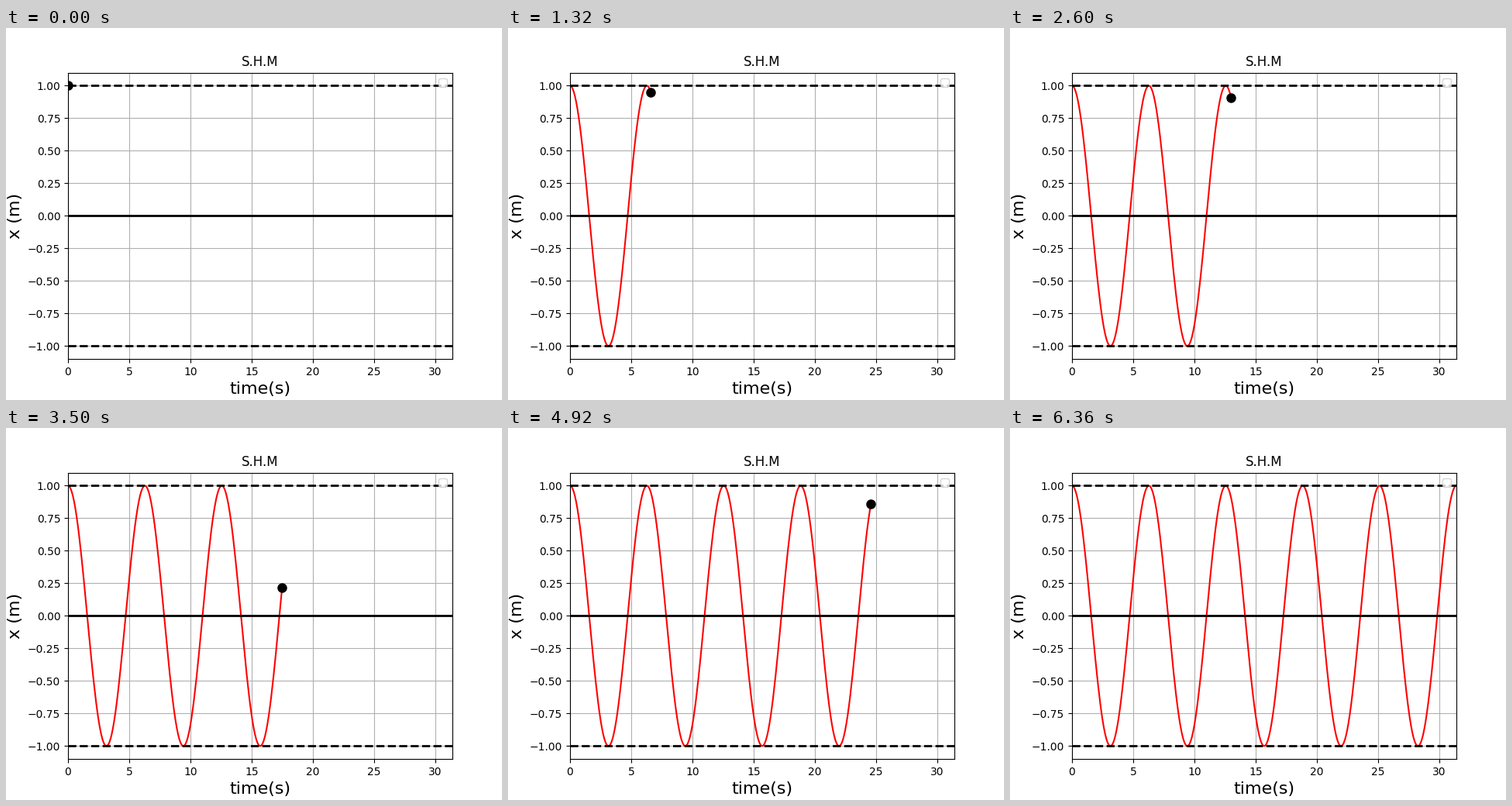
These frames come from a looping animation (640x480 px, 10000 ms). A matplotlib script:

```python
import numpy as np
import matplotlib.pyplot as plt
from matplotlib.animation import FuncAnimation

STEP = 0.1        # seconds of motion per frame
INTERVAL = 20     # ms per frame
FRAMES = 500
LAST = 318        # motion stops here, just past the right edge

t = np.arange(LAST + 1) * STEP
x = np.cos(t)

fig, ax = plt.subplots(figsize=(6.4, 4.8), dpi=100)
ax.set_xlim(0, 10 * np.pi)
ax.set_ylim(-1.1, 1.1)
ax.set_title("S.H.M")
ax.set_xlabel("time(s)", fontsize=16)
ax.set_ylabel("x (m)", fontsize=16)
ax.grid()

curve, = ax.plot([], [], "r-", lw=1.5)
ball, = ax.plot([], [], "ko", ms=8)
for level, style in ((0, "-"), (1, "--"), (-1, "--")):
    ax.axhline(level, color="k", ls=style, lw=2)
ax.legend([], [], loc="upper right")


def update(frame):
    i = min(frame, LAST)
    curve.set_data(t[:i + 1], x[:i + 1])
    ball.set_data([t[i]], [x[i]])
    return curve, ball


anim = FuncAnimation(fig, update, frames=FRAMES, interval=INTERVAL,
                     init_func=lambda: update(0), repeat=True, repeat_delay=0)

plt.show()
```
